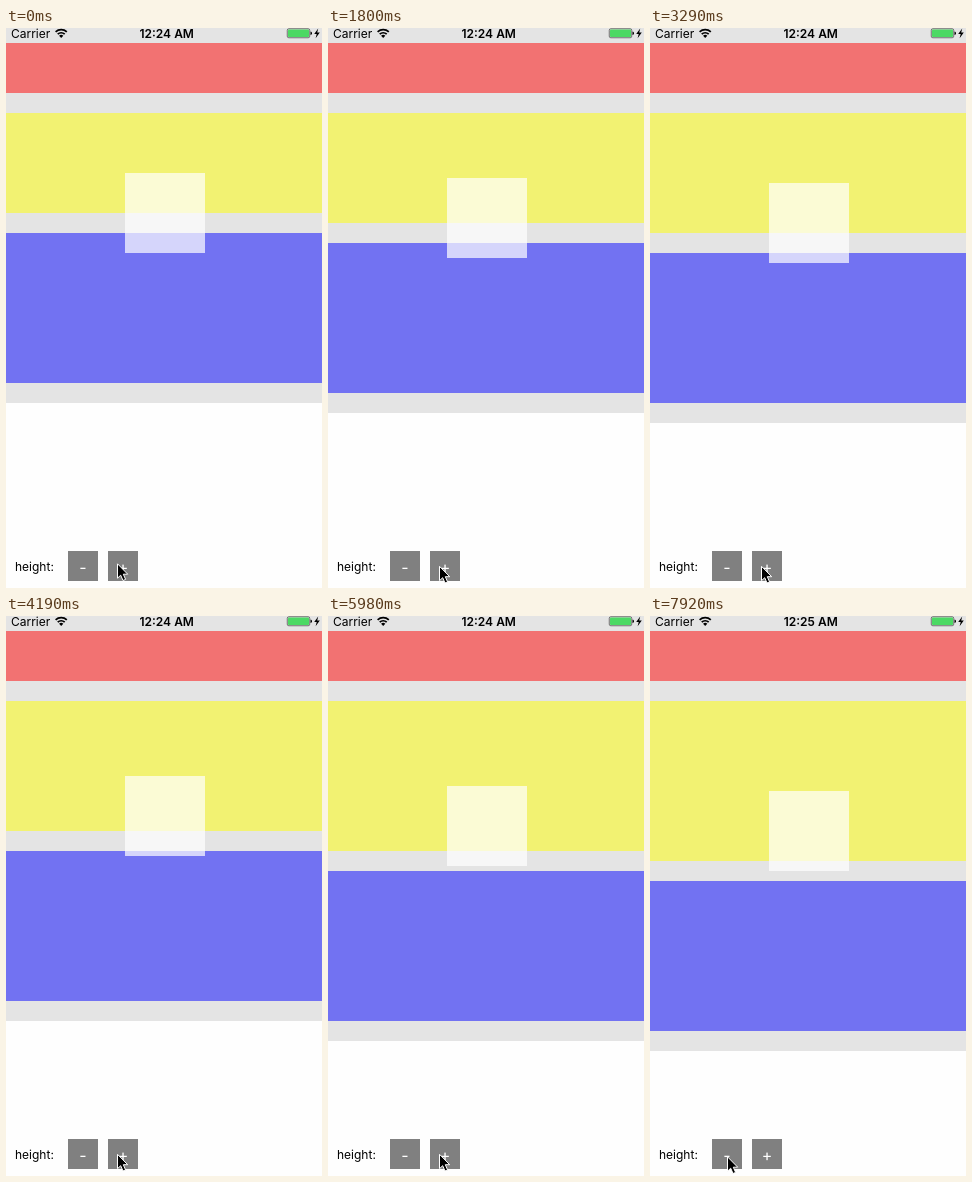
Animation of 316x560 px, one loop 8 s. Source, as an HTML page:

```html
<!DOCTYPE html>
<html lang="en">
<head>
<meta charset="utf-8">
<title>Adjustable height</title>
<style>
  html, body { margin: 0; width: 100%; height: 100%; overflow: hidden; background: #fefefe; }
  svg { display: block; width: 316px; height: 560px; }
  text { font: 12px Inter, Roboto, sans-serif; }
  .clock { font-weight: 600; text-anchor: middle; }
  .sign { font-size: 16px; fill: #fff; text-anchor: middle; }
</style>
</head>
<body>
<svg viewBox="0 0 316 560">
  <rect width="316" height="560" fill="#fefefe"/>
  <rect id="panel" width="316" fill="#e4e4e4"/>
  <rect y="15" width="316" height="50" fill="#f27272"/>
  <rect id="yellow" y="85" width="316" fill="#f2f272"/>
  <rect id="blue" width="316" height="150" fill="#7272f2"/>
  <rect id="square" x="119" width="80" height="80" fill="#fff" fill-opacity=".7"/>

  <text x="5" y="9.8">Carrier</text>
  <g fill="none" stroke="#000" stroke-width="1.7">
    <path d="M49.6 3.9A8.1 8.1 0 0 1 60.8 3.9"/>
    <path d="M51.7 6.2A5 5 0 0 1 58.7 6.2"/>
  </g>
  <path d="M55.2 10L53.1 7.8A3 3 0 0 1 57.3 7.8Z"/>
  <text id="clock" class="clock" x="160.7" y="9.8"></text>
  <rect x="281.25" y=".75" width="22.5" height="9" rx="1.6" fill="none" stroke="#222" stroke-width=".6"/>
  <rect x="282" y="1.5" width="21" height="7.5" rx=".8" fill="#4cd964"/>
  <path d="M304.5 3.5Q306 3.8 306 5.2T304.5 7Z"/>
  <path d="M312.2 .6L308.2 6H310.7L309.6 10.2L313.8 4.4H311.2Z"/>

  <text x="9" y="542.5">height:</text>
  <g fill="#808080">
    <rect x="62" y="523" width="30" height="30"/>
    <rect x="102" y="523" width="30" height="30"/>
  </g>
  <text class="sign" x="77" y="544.5">-</text>
  <text class="sign" x="117" y="544.5">+</text>
  <path id="cursor" d="M.5 .8V15.2L3.7 12.2L6 17.5L8.6 16.4L6.3 11.2H10.7Z"
        stroke="#fff" stroke-width="1" stroke-linejoin="round"/>
</svg>
<script>
  const LOOP = 8000;
  const presses = [1200, 1800, 2700, 3290, 3740, 4190, 4640, 5090, 5540, 5980, 6580, 7020];
  // time, x, y of the pointer tip
  const pointer = [[0, 111, 535], [150, 111, 537.5], [7620, 86, 541], [7770, 78, 541], [7920, 77, 540]];
  const el = id => document.getElementById(id);
  const set = (id, name, value) => el(id).setAttribute(name, value);

  function draw(t) {
    const count = presses.filter(time => time <= t).length;
    const height = 100 + 5 * count;
    set('yellow', 'height', height);
    set('blue', 'y', height + 105);
    set('panel', 'height', height + 275);
    set('square', 'y', 145 + 2.5 * count);
    el('clock').textContent = t < 6580 ? '12:24 AM' : '12:25 AM';
    const [, x, y] = pointer.filter(p => p[0] <= t).pop();
    set('cursor', 'transform', `translate(${x} ${y})`);
  }

  const start = performance.now();
  function tick() {
    draw((performance.now() - start) % LOOP);
    requestAnimationFrame(tick);
  }
  draw(0);
  requestAnimationFrame(tick);
</script>
</body>
</html>
```
